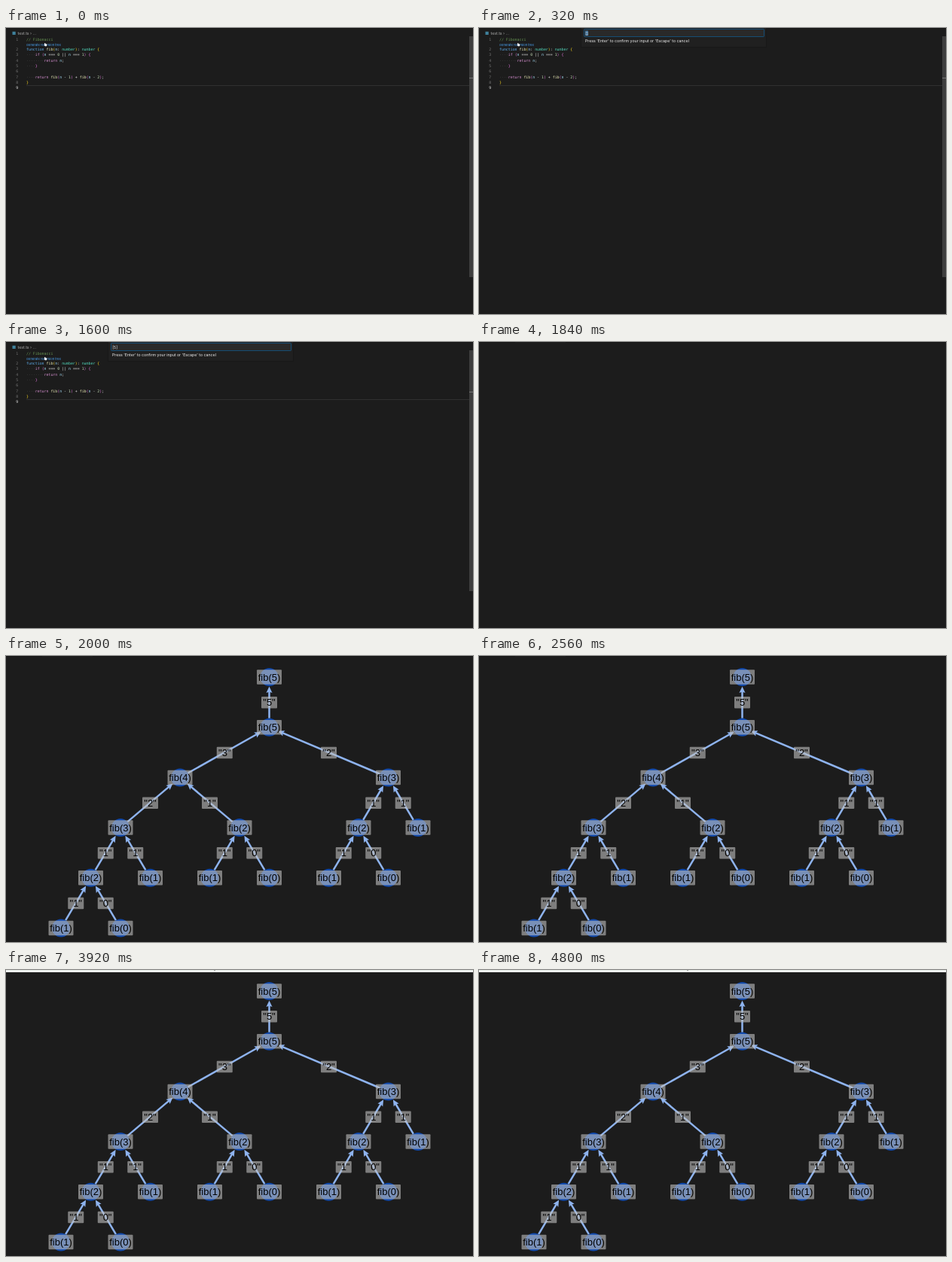
An HTML page that plays this animation: 620 by 380 pixels, repeating every 4.88 s.

```html
<!DOCTYPE html>
<html lang="en">
<head>
<meta charset="utf-8">
<title>Recursion tree</title>
<style>
  html, body { margin: 0; width: 100%; height: 100%; overflow: hidden; background: #1c1c1c; }
  svg { display: block; }
  text { white-space: pre; }
  .code { font: 4.9px "DejaVu Sans Mono", monospace; }
  .ui { font: 5.24px Inter, sans-serif; }
  .lens { font: 4.1px Inter, sans-serif; }
  .tree { font: 13px "Liberation Sans", Arial, sans-serif; text-anchor: middle; }
</style>
</head>
<body>
<svg id="stage" width="620" height="380" viewBox="0 0 620 380"></svg>
<script>
const LOOP = 4880;
const NS = "http://www.w3.org/2000/svg";
const stage = document.getElementById("stage");

function add(parent, tag, attrs = {}, text) {
  const el = document.createElementNS(NS, tag);
  for (const key in attrs) el.setAttribute(key, attrs[key]);
  if (text !== undefined) el.textContent = text;
  parent.appendChild(el);
  return el;
}
const group = (parent = stage) => add(parent, "g");
const rect = (parent, x, y, width, height, fill, more) =>
  add(parent, "rect", { x, y, width, height, fill, ...more });
const label = (parent, x, y, cls, fill, text) =>
  add(parent, "text", { x, y, class: cls, fill }, text);

const color = {
  c: "#6a9955", k: "#5fb0f0", f: "#ececb8", v: "#a8e4ff", t: "#52d8bc",
  r: "#d68fd0", n: "#c4dcb6", o: "#e8e8e8", y: "#ffdc20", p: "#e27ade", w: "#484848"
};

// Each line: [number, baseline, [color key, text]...]
const lines = [
  [1, 16.7, ["c", "// Fibonacci"]],
  [2, 30, ["k", "function "], ["f", "fib"], ["y", "("], ["v", "n"], ["o", ": "], ["t", "number"],
    ["y", ")"], ["o", ": "], ["t", "number "], ["y", "{"]],
  [3, 37.3, ["w", "····"], ["r", "if "], ["p", "("], ["v", "n "], ["o", "=== "], ["n", "0 "],
    ["o", "|| "], ["v", "n "], ["o", "=== "], ["n", "1"], ["p", ") {"]],
  [4, 44.6, ["w", "········"], ["r", "return "], ["v", "n"], ["o", ";"]],
  [5, 51.9, ["w", "····"], ["p", "}"]],
  [6, 59.2],
  [7, 66.5, ["w", "····"], ["r", "return "], ["f", "fib"], ["p", "("], ["v", "n "], ["o", "- "],
    ["n", "1"], ["p", ") "], ["o", "+ "], ["f", "fib"], ["p", "("], ["v", "n "], ["o", "- "],
    ["n", "2"], ["p", ")"], ["o", ";"]],
  [8, 73.8, ["y", "}"]],
  [9, 81.1]
];

function buildEditor() {
  const g = group();
  rect(g, 0, 0, 620, 1, "#151515");
  rect(g, 8.5, 4.8, 4.2, 4.2, "#3f819c");
  label(g, 15.5, 8.7, "ui", "#a9a9a9", "test.ts › …");
  rect(g, 27, 76, 588, 1, "#303030");
  for (const [num, y, ...parts] of lines) {
    label(g, 16.3, y, "code", num === 9 ? "#e0e0e0" : "#747474", num).setAttribute("text-anchor", "end");
    const row = add(g, "text", { x: 27, y, class: "code" });
    for (const [key, text] of parts) add(row, "tspan", { fill: color[key] }, text);
  }
  label(g, 27, 23.7, "lens", "#4aa3f5", "Generate recursion tree");
  add(g, "path", { d: "M51 20.2l1-.3.5 1.1 1.7.5v1.5l-.7 1.3h-1.6l-1.3-1.8.6-.4z", fill: "#fff" });
  rect(g, 615, 11, 5, 320, "#3e3e3e");
  rect(g, 615, 66, 5, 1, "#777");
  return g;
}

function buildPrompt() {
  const g = group();
  rect(g, 135, 0, 247, 26, "#181818");
  rect(g, 136, 0, 245, 25, "#202020");
  rect(g, 139.5, 1.5, 239, 10, "#292929", { stroke: "#14588a", "stroke-width": 0.8, rx: 0.7 });
  const mark = rect(g, 141, 3.5, 4, 6.5, "#3a6c94");
  const value = label(g, 141.2, 8.6, "ui", "#e8e8e8", "[]");
  label(g, 141, 18.9, "ui", "#f0f0f0", "Press 'Enter' to confirm your input or 'Escape' to cancel");
  return { g, mark, value };
}

function buildTree() {
  const g = group();
  const edges = group(g), dots = group(g), heads = group(g), labels = group(g);
  const RADIUS = 12;
  const blue = "#8eb3ee";
  const place = (col, row) => [73 + col * 39.5, 28 + row * 66.7];

  function tag(x, y, text, w, h) {
    rect(labels, x - w / 2, y - h / 2, w, h, "#c0c0c0", { "fill-opacity": 0.6, rx: 1 });
    label(labels, x, y + 4.5, "tree", "#000", text);
  }

  function node(n, col, row, parent, result) {
    const [x, y] = place(col, row);
    add(dots, "circle", { cx: x, cy: y, r: RADIUS, fill: "#1049ad" });
    tag(x, y, `fib(${n})`, 33, 19.5);
    if (!parent) return [x, y];
    const [px, py] = parent;
    const len = Math.hypot(px - x, py - y);
    const ux = (px - x) / len, uy = (py - y) / len;
    const at = (d, side = 0) => `${px - ux * d - uy * side} ${py - uy * d + ux * side}`;
    add(edges, "path", { d: `M${x + ux * RADIUS} ${y + uy * RADIUS}L${at(19)}`, stroke: blue, "stroke-width": 2.5 });
    add(heads, "path", { d: `M${at(12.5)}L${at(21, 4)}L${at(19.5)}L${at(21, -4)}Z`, fill: blue });
    tag((x + px) / 2, (y + py) / 2 + 0.4, `"${result}"`, 21, 15.5);
    return [x, y];
  }

  // Column offsets of the two calls made by fib(n)
  const spread = { 5: [-3, 4], 4: [-2, 2], 3: [-1, 1], 2: [-1, 1] };
  const fib = n => n < 2 ? n : fib(n - 1) + fib(n - 2);

  function grow(n, col, row, parent) {
    const here = node(n, col, row, parent, fib(n));
    if (n < 2) return;
    spread[n].forEach((dx, i) => grow(n - 1 - i, col + dx, row + 1, here));
  }
  grow(5, 7, 1, node(5, 7, 0));
  return g;
}

function buildTabLine() {
  const g = group();
  rect(g, 0, 0, 48, 1, "#151515");
  rect(g, 115, 0, 505, 1, "#151515");
  return g;
}

function buildTopBar() {
  const g = group();
  rect(g, 0, 0, 620, 3, "#eef3ef");
  rect(g, 276.5, 0, 1, 1, "#555");
  return g;
}

const editor = buildEditor();
const prompt = buildPrompt();
const tabLine = buildTabLine();
const tree = buildTree();
const topBar = buildTopBar();

const show = (el, on) => { el.style.display = on ? "" : "none"; };

function draw(t) {
  show(editor, t < 1840);
  show(prompt.g, t >= 80 && t < 1760);
  show(prompt.mark, t < 1280);
  prompt.value.textContent = t < 1280 ? "[]" : "[5]";
  show(tabLine, t >= 1840 && t < 3680);
  show(tree, t >= 2000);
  show(topBar, t >= 3680);
}

const start = performance.now();
function tick() {
  draw((performance.now() - start) % LOOP);
  requestAnimationFrame(tick);
}
draw(0);
requestAnimationFrame(tick);
</script>
</body>
</html>
```
